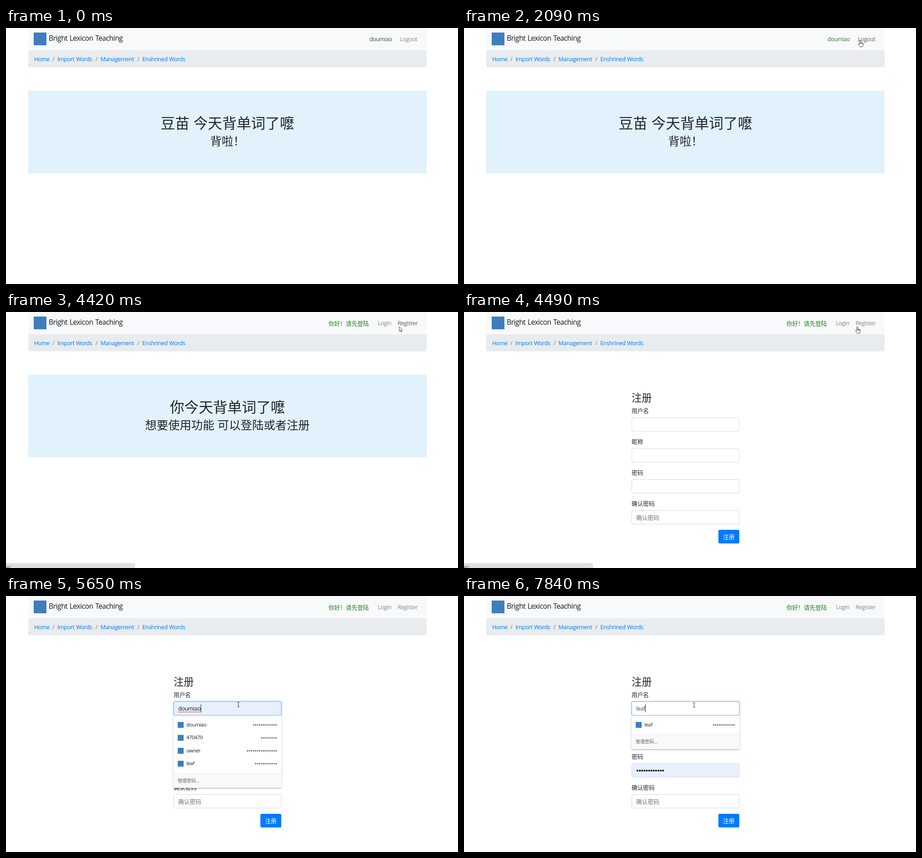
These frames come from a looping animation (995x563 px, 8 s). An HTML page:

```html
<!DOCTYPE html>
<html lang="zh-CN">
<head>
<meta charset="utf-8">
<style>
html, body { margin: 0; width: 100%; height: 100%; overflow: hidden; background: #fff; }
svg { display: block; width: 995px; height: 563px; }
text { font-family: "Open Sans", "Noto Sans CJK SC", "Noto Sans CJK", sans-serif; font-size: 12.6px; letter-spacing: -.034em; word-spacing: .06em; white-space: pre; }
.cn { font-family: "Noto Sans CJK SC", "Noto Sans CJK", sans-serif; font-size: 12.7px; letter-spacing: 0; word-spacing: .05em; }
.mid { text-anchor: middle; }
</style>
</head>
<body>
<svg id="stage" viewBox="0 0 995 563" xmlns="http://www.w3.org/2000/svg"></svg>
<script>
const LOOP = 8000;
const USER = 'doumiao', NICK = '豆苗', SHORT = 'leaf';
const LOGO = '#3f7dbd', INK = '#212529', LINK = '#007bff';

const text = (x, y, s, fill = INK, size = 12.6, extra = '') =>
  `<text x="${x}" y="${y}" fill="${fill}" style="font-size:${size}px" ${extra}>${s}</text>`;
const cn = (x, y, s, fill = INK, size = 12.7, cls = '', extra = '') =>
  text(x, y, s, fill, size, `class="cn ${cls}" ${extra}`);
const rect = (x, y, w, h, fill, r = 0, extra = '') =>
  `<rect x="${x}" y="${y}" width="${w}" height="${h}" rx="${r}" fill="${fill}" ${extra}/>`;
const group = (id, body) => `<g id="${id}">${body}</g>`;

function dots(n, right, y, pitch, r, fill) {
  let s = '';
  for (let i = 0; i < n; i++) s += `<circle cx="${right - i * pitch}" cy="${y}" r="${r}" fill="${fill}"/>`;
  return s;
}

function hero(id, title, sub) {
  return group(id, cn(487.5, 220.5, title, INK, 31.7, 'mid') + cn(487.5, 258.4, sub, INK, 25.4, 'mid'));
}

function field(y, label, id = '') {
  return cn(369, y - 10.6, label) +
    rect(369.5, y, 236.5, 29.8, '#fff', 3, `id="${id}" stroke="#ced4da" stroke-width=".9"`);
}

function menu(id, rows, foot, bottom) {
  const items = rows.map(([name, n], i) => {
    const y = 283 + i * 28.45;
    return rect(378, y - 6, 13, 13, LOGO) + text(397, y + 3.7, name, '#202124', 11.2) +
      dots(n, 594.6, y + .5, 4.5, 1.5, '#55585c');
  }).join('');
  return group(id,
    rect(368.5, 263, 238, bottom - 263, '#fff', 2.5, 'filter="url(#shade)"') +
    rect(368.5, foot, 238, bottom - foot, '#f8f9fa', 2.5) +
    rect(368.5, foot, 238, .8, '#eceef0') + items +
    cn(378, (foot + bottom) / 2 + 4, '管理密码...', '#5f6368', 10));
}

const crumbs = [[62, 'Home'], [113, 'Import Words'], [208, 'Management'], [300, 'Enshrined Words']]
  .map(([x, s]) => text(x, 73, s, LINK)).join('') +
  [102, 197, 289].map(x => text(x, 73, '/', '#6c757d')).join('');

const fields = [[300.5, '昵称'], [368.5, '密码', 'pass'], [436.5, '确认密码']]
  .map(f => field(...f)).join('');

document.getElementById('stage').innerHTML = `
<defs><filter id="shade" x="-10%" y="-10%" width="120%" height="125%">
<feDropShadow dx="0" dy="1" stdDeviation="1.5" flood-color="#000" flood-opacity=".4"/></filter></defs>` +
rect(0, 0, 995, 563, '#fff') +
rect(49, 0, 877, 49, '#f8f9fa') + rect(49, 49, 877, 37.5, '#e9ecef', 3) +
rect(61, 10, 28, 28, LOGO) + text(94, 28.4, 'Bright Lexicon Teaching', '#17191b', 15.8) + crumbs +
group('inNav', text(800, 29.2, USER, '#000', 12.6, 'id="user"') + text(867, 29.2, 'Logout', '#000', 12.6, 'id="logout"')) +
group('outNav', cn(710, 29.6, '你好！请先登陆', '#218021') +
  text(818.5, 29.2, 'Login', '#000', 12.6, 'id="login"') + text(862, 29.2, 'Register', '#000', 12.6, 'id="register"')) +
group('home', rect(49, 137.3, 877, 182.3, '#e1f2fc') +
  hero('inHero', NICK + ' 今天背单词了嚒', '背啦！') +
  hero('outHero', '你今天背单词了嚒', '想要使用功能 可以登陆或者注册')) +
group('form', cn(369, 197, '注册', INK, 22.2) +
  rect(367.2, 230.3, 241.1, 34.2, '#bfdeff', 5, 'id="ring"') +
  field(232.5, '用户名', 'name') + fields +
  rect(379, 239.5, 1, 16, '#3297fd', 0, 'id="mark"') +
  text(379, 252.2, '', INK, 12.6, 'id="typed"') +
  rect(379, 254.6, 1, 1, '#e03a30', 0, 'id="spell"') +
  rect(379, 238.6, 1, 17, '#111', 0, 'id="caret"') +
  group('passDots', dots(12, 438.2, 384, 5.12, 2.1, '#111')) +
  cn(379, 456.8, '确认密码', '#6c757d') +
  rect(560, 479, 46, 30, LINK, 3) + cn(583, 499.4, '注册', '#fff', 12.7, 'mid') +
  menu('fullMenu', [[USER, 12], ['470470', 8], ['owner', 15], [SHORT, 11]], 390, 422) +
  menu('shortMenu', [[SHORT, 11]], 303, 337)) +
group('status', rect(-4, 552.3, 288, 20, '#dfe0e1', 3) + text(0, 564, 'er/', '#4a4d50', 8.6, 'id="url"')) +
group('cursor',
  `<path id="arrow" d="M0 0V10.2L2.3 8.1 3.9 11.6 5.4 10.9 3.9 7.5H7Z" fill="#fff" stroke="#222" stroke-width=".85"/>
   <path id="hand" d="M-1.2 9V.8C-1.2-.9 1.1-.9 1.1.8V5.2C1.5 4.3 3 4.5 3.1 5.5 3.6 4.8 4.9 5.1 5 6.1 5.7 5.6 6.6 6.1 6.6 7V10.4C6.6 12.1 5.6 12.7 5.4 14.4H-.2C-.6 12.6-2.8 10.8-3.8 8.7-4.2 7.5-2.9 6.9-2.1 7.9Z M1.1 5.2V8.3M3.1 5.6V8.5M5 6.2V8.7" fill="#fff" stroke="#222" stroke-width=".85"/>
   <path id="beam" d="M-2.4-5.2H-.7L0-4.7 .7-5.2H2.4M0-4.7V4.7M-2.4 5.2H-.7L0 4.7 .7 5.2H2.4" fill="none" stroke="#222" stroke-width=".95"/>`);

const el = {};
document.querySelectorAll('[id]').forEach(e => el[e.id] = e);
const show = (e, on) => e.setAttribute('display', on ? 'inline' : 'none');
const set = (e, k, v) => e.setAttribute(k, v);
const ramp = (t, a, b) => Math.max(0, Math.min(1, (t - a) / (b - a)));

// Pointer moves: start, end, steps, destination
const moves = [
  [70, 300, 4, 904, 455], [620, 1150, 8, 643, 73],
  [1470, 1780, 5, 815, 15], [1860, 2090, 4, 872, 27],
  [2170, 2240, 2, 871, 25], [2320, 2320, 1, 873, 24],
  [2870, 3170, 5, 760, 50], [3250, 3640, 6, 835, 30],
  [3710, 3790, 2, 868, 26], [4170, 4170, 1, 860, 24],
  [4420, 4420, 1, 865.8, 32.5], [4720, 5260, 8, 511.6, 238.7],
  [6280, 6360, 2, 506.6, 240]
];

function pointer(t) {
  let x = 940, y = 561;
  for (const [a, b, n, tx, ty] of moves) {
    if (t < a) break;
    const k = n > 1 ? Math.min(n, Math.floor((t - a + 8) / (b - a) * (n - 1)) + 1) : 1;
    const p = k / n, e = n > 2 ? (p + p * p * (3 - 2 * p)) / 2 : p;
    x += (tx - x) * e;
    y += (ty - y) * e;
  }
  return [x, y];
}

function hovered(x, y, inside) {
  if (y > 8 && y < 41) {
    if (inside) return x > 794 && x < 854 ? 'user' : x > 861 && x < 913 ? 'logout' : '';
    return x > 812 && x < 856 ? 'login' : x >= 856 && x < 913 ? 'register' : '';
  }
  return '';
}

function draw(t) {
  const inside = t < 2550, form = t >= 4490;
  const [x, y] = pointer(t);
  const over = hovered(x, y, inside);

  show(el.inNav, inside); show(el.inHero, inside);
  show(el.outNav, !inside); show(el.outHero, !inside);
  show(el.home, !form); show(el.form, form);
  set(el.user, 'fill', t < 1860 ? '#35593a' : '#34753a');
  for (const id of ['logout', 'login', 'register'])
    set(el[id], 'fill', over === id && !form ? '#606162' : '#858687');

  const filled = t >= 4720, focus = t >= 5430, typing = t >= 7370;
  const marked = t >= 6660 && !typing;
  const count = 1 + [7440, 7610, 7840].filter(s => t >= s).length;
  el.typed.textContent = typing ? SHORT.slice(0, count) : filled ? USER : '';
  set(el.typed, 'fill', marked ? '#fff' : typing ? '#495057' : '#16181b');
  const w = form && filled ? el.typed.getComputedTextLength() : 0;
  set(el.name, 'fill', filled && !typing ? '#e8f0fe' : '#fff');
  set(el.name, 'stroke', focus ? '#80bdff' : '#ced4da');
  set(el.pass, 'fill', filled ? '#e8f0fe' : '#fff');
  show(el.passDots, filled);
  show(el.ring, focus);
  set(el.ring, 'opacity', ramp(t, 5360, 5580));
  set(el.mark, 'width', w); show(el.mark, marked);
  set(el.spell, 'width', w); show(el.spell, t >= 5500 && !typing);
  set(el.caret, 'x', 379 + w);
  show(el.caret, focus && !marked && !(t >= 5970 && t < 6510));
  show(el.fullMenu, t >= 5500 && !typing);
  show(el.shortMenu, typing);

  el.url.textContent = t < 2900 ? 'ut/' : 'er/';
  set(el.status, 'opacity', ramp(t, 2095, 2320) - ramp(t, 2870, 3100) + ramp(t, 3870, 4020) - ramp(t, 4720, 4950));

  const beam = x > 369 && x < 606 && y > 232 && y < 263;
  const hand = over && !(t >= 4420 && t < 4490);
  show(el.cursor, t >= 70);
  set(el.cursor, 'transform', `translate(${x} ${y})`);
  show(el.beam, beam);
  show(el.hand, hand);
  show(el.arrow, !beam && !hand);
}

function tick(now) {
  draw(now % LOOP);
  requestAnimationFrame(tick);
}
draw(0);
requestAnimationFrame(tick);
</script>
</body>
</html>
```
